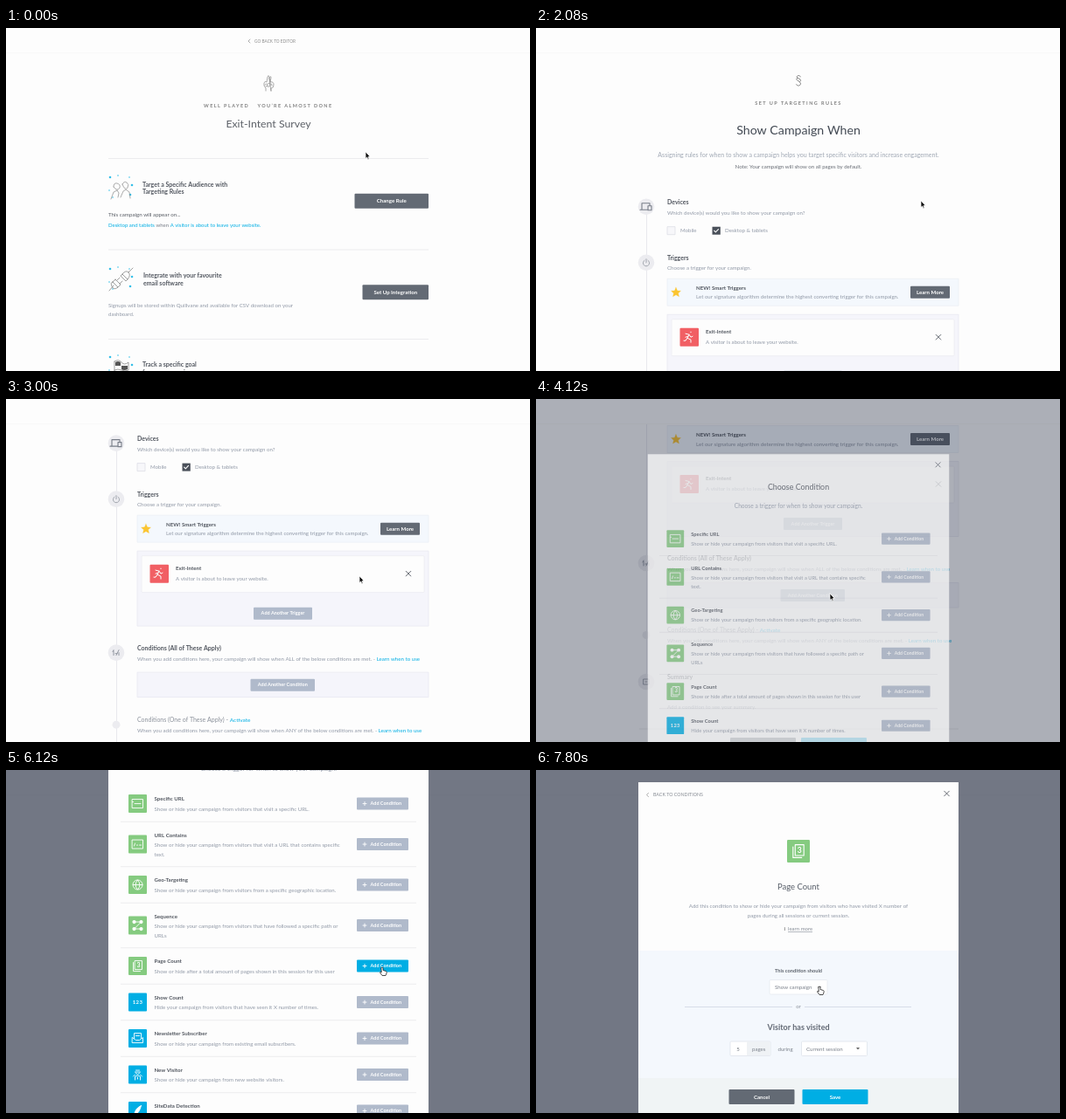
An HTML page with a canvas that plays this animation: 599 px wide and 393 px high, repeating every 8000 ms.

```html
<!DOCTYPE html>
<html lang="en">
<head>
<meta charset="utf-8">
<title>Campaign targeting rules</title>
<style>
  html, body { margin: 0; width: 100%; height: 100%; overflow: hidden; background: #fdfdfd; }
  canvas { display: block; width: 599px; height: 393px; }
</style>
</head>
<body>
<canvas id="stage" width="599" height="393"></canvas>
<script>
const W = 599, H = 393, LOOP = 8000;
const screen2d = document.getElementById('stage').getContext('2d');
const scratch = document.createElement('canvas');
scratch.width = W;
scratch.height = H;
const scratch2d = scratch.getContext('2d');
let ctx = screen2d;

const WHITE = '#fdfdfd', INK = '#51565f', SOFT = '#9199a7', CYAN = '#00aee4', GREEN = '#85cb80';
const SLATE = '#636a74', MUTED = '#b0bacb', RULE = '#ececee', PALE = '#f4f8fd', LILAC = '#f5f5fb';
const VEIL = 'rgb(23 30 53 / 0.6)';

// ---- timing ----
const clamp = v => Math.max(0, Math.min(1, v));
const ramp = (t, a, b) => clamp((t - a) / (b - a));
const smooth = p => p * p * (3 - 2 * p);
const easeOut = p => 1 - (1 - p) ** 2;

function track(keys, t) {
  if (t <= keys[0][0]) return keys[0].slice(1);
  for (let i = 1; i < keys.length; i++) {
    if (t > keys[i][0]) continue;
    const [a, b] = [keys[i - 1], keys[i]];
    const p = smooth(ramp(t, a[0], b[0]));
    return a.slice(1).map((v, k) => v + (b[k + 1] - v) * p);
  }
  return keys[keys.length - 1].slice(1);
}

const PAGE_SCROLL = [[2060, 0], [2840, 128], [2900, 128], [3140, 197], [3300, 197], [3520, 257]];
const MODAL_SCROLL = [[4560, 0], [4860, 55], [4980, 55], [5090, 78.5]];
const POINTER = [
  [820, 411, 142], [1160, 440, 198], [2450, 440, 198], [2840, 404, 203], [3660, 404, 203],
  [3920, 336, 223], [4260, 336, 223], [4600, 325, 225], [5660, 325, 225], [6060, 430, 226],
  [6900, 430, 226], [7480, 371, 232], [7540, 371, 232], [7800, 324, 248]
];

// ---- drawing helpers ----
function rect(x, y, w, h, fill, stroke, r = 0) {
  ctx.beginPath();
  ctx.roundRect(x, y, w, h, r);
  if (fill) { ctx.fillStyle = fill; ctx.fill(); }
  if (stroke) { ctx.strokeStyle = stroke; ctx.lineWidth = 0.8; ctx.stroke(); }
}

function disc(x, y, r, fill) {
  ctx.beginPath();
  ctx.arc(x, y, r, 0, 7);
  ctx.fillStyle = fill;
  ctx.fill();
}

function path(d, x, y, color, width = 0.8, fill) {
  const p = new Path2D(d);
  ctx.save();
  ctx.translate(x, y);
  ctx.lineCap = ctx.lineJoin = 'round';
  if (fill) { ctx.fillStyle = fill; ctx.fill(p); }
  ctx.strokeStyle = color;
  ctx.lineWidth = width;
  if (width) ctx.stroke(p);
  ctx.restore();
}

const hline = (x1, x2, y, color = RULE) => rect(x1, y - 0.5, x2 - x1, 1, color);

// y is the optical middle of the line; returns the x where the text ends
function text(str, x, y, size = 6.13, color = SOFT, { bold, align = 'left', gap = 0 } = {}) {
  ctx.font = `${bold ? 700 : 400} ${size}px Lato, sans-serif`;
  ctx.letterSpacing = gap + 'px';
  ctx.textAlign = align;
  ctx.fillStyle = color;
  ctx.fillText(str, x, y + size * 0.34);
  return x + ctx.measureText(str).width;
}
const heading = (str, x, y, size = 7) => text(str, x, y, size, INK, { bold: true });
const centered = (str, y, size, color, opts) => text(str, 300, y, size, color, { align: 'center', ...opts });

function button(label, x, y, w, h, fill, size = 6.1) {
  rect(x, y, w, h, fill, null, 1);
  text(label, x + w / 2, y + h / 2, size, '#fff', { bold: true, align: 'center' });
}

const cross = (x, y) => path('M-2.8-2.8L2.8 2.8M2.8-2.8L-2.8 2.8', x, y, '#555b64', 0.9);
const chevron = (x, y) => path('M1-2L-1 0L1 2', x, y, '#888', 0.7);
const caret = (x, y) => path('M-2-1H2L0 1.5Z', x, y, '#666', 0, '#666');

function group(alpha, draw) {
  if (alpha <= 0) return;
  if (alpha >= 1) return draw();
  scratch2d.clearRect(0, 0, W, H);
  ctx = scratch2d;
  draw();
  ctx = screen2d;
  ctx.globalAlpha = alpha;
  ctx.drawImage(scratch, 0, 0);
  ctx.globalAlpha = 1;
}

function at(x, y, scale, draw) {
  ctx.save();
  ctx.translate(x, y);
  ctx.scale(scale, scale);
  draw();
  ctx.restore();
}

// ---- campaign overview ----
function sparks(x, y) {
  [[-12, -12], [-3, -14], [10, -12], [13, -3], [-13, 3], [-9, 11], [11, 8]]
    .forEach(([dx, dy], i) => disc(x + dx, y + dy, i % 3 ? 0.8 : 1.3, '#35bfe8'));
}

function overview() {
  chevron(278, 15);
  text('GO BACK TO EDITOR', 284, 15, 4.75, '#8c8c8c');
  path('M-3 9V6Q-6 3-5 0T-2-1L-1-7Q0-10 1-7L2-1M1-6Q3-9 3-6L2-1Q6-2 6 2T3 6V9ZM-4 2Q-2 0-1 2T-3 4M-1 1Q2-1 2 2T-1 4M2 1Q4 0 4 3', 300, 63, '#888', 0.7);
  text('WELL PLAYED', 226, 89, 5.5, '#808080', { bold: true, gap: 1.42 });
  text('YOU’RE ALMOST DONE', 287.5, 89, 5.5, '#808080', { bold: true, gap: 1.38 });
  centered('Exit-Intent Survey', 109.5, 12.3, '#5c6067');
  [149.5, 254, 356.5].forEach(y => hline(117, 483, y));

  sparks(131, 183);
  path('M-11 12L-8 4L-4 2M-8-2Q-8-7-4-6T-1-1Q-4 4-8-2M0 10L3 3L6 1L10 4L11 11M2-5Q4-9 7-7T8-1Q5 3 2-5M-4 2L-2 5L-3 10', 131, 184, '#888', 0.7);
  heading('Target a Specific Audience with', 156, 179.5);
  heading('Targeting Rules', 156, 188);
  text('This campaign will appear on...', 117, 214, 6.2, '#585d65');
  let x = text('Desktop and tablets ', 117, 226, 6.03, CYAN);
  x = text('when ', x, 226, 6.03, '#777d87');
  text('A visitor is about to leave your website.', x, 226, 6.03, CYAN);
  button('Change Rule', 398.5, 189.8, 84.5, 17, SLATE);

  sparks(131, 288);
  path('M-13 13L-8 7M-9 3L-3 9Q-8 13-10 8T-9 3M-6 0L0 6L-3 9M-9 3L-6 0M-4 1L-1-2M-1 5L2 2M2-6L8 0Q12-5 9-8T2-6L0-4L6 2L8 0M9-8L14-13', 131, 288, '#808080', 0.75);
  heading('Integrate with your favourite', 157, 284);
  heading('email software', 157, 293);
  text('Signups will be stored within Quillvane and available for CSV download on your', 117, 317.5, 6.08);
  text('dashboard.', 117, 328, 6.08);
  button('Set Up Integration', 407.5, 294.3, 75.5, 17, SLATE);

  sparks(131, 389);
  path('M-7-7V10M-7-7Q-2-10 1-6T9-6V3Q5 5 1 3T-7 3', 131, 389, '#777', 0.7);
  path('M-6-6Q-3-8 0-6V-2H-6ZM1-2H8V2Q4 4 1 2Z', 131, 389, '#555', 0, '#555');
  heading('Track a specific goal', 156, 386);
  heading('for your campaign', 156, 395);
}

// ---- targeting rules page ----
function conditionNote(y, which) {
  const x = text(`When you add conditions here, your campaign will show when ${which} of the below conditions are met. - `, 150, y);
  text('Learn when to use', x, y, 6.13, CYAN);
}

function rules(scroll) {
  ctx.save();
  ctx.beginPath();
  ctx.rect(0, 29, W, H);
  ctx.clip();
  ctx.translate(0, -scroll);

  path('M2.5-4.5Q1-6.5-1-5.5T-1-3L2-1.5Q3.5 0 1.5 1.5L-1 0Q-3.5-1-1.5-3M1.5 1.5Q4 4 1.5 5.5T-2.5 4.5', 300, 60.5, '#808080', 0.9);
  centered('SET UP TARGETING RULES', 86, 5.5, '#808080', { bold: true, gap: 1.42 });
  centered('Show Campaign When', 117, 14.2, '#434a54');
  centered('Assigning rules for when to show a campaign helps you target specific visitors and increase engagement.', 146, 7.05, '#a0a8b4');
  centered('Note: Your campaign will show on all pages by default.', 159, 6.1, '#666b73');

  rect(126, 205, 0.8, 376, '#e4e4ea');
  [205, 269, 445, 581].forEach(y => disc(126, y, 9.3, '#ececf0'));
  disc(126, 527.5, 4.5, '#ececf0');
  path('M-5 3V-4H4V-1M-7 3.5H2M2-1H6V4H2Z', 126, 205, '#777d88', 1.1);
  path('M-2-2.5A3.6 3.6 0 1 0 2-2.5M0-4V0', 126, 269, '#9a9fa8', 0.9);
  path('M-3 3V-2M-4-1L-3-3M0 3L3-3M3 3V0M-1 1H1', 126, 445, '#8b909a', 0.9);
  path('M-3-3H3V3H-3ZM-1 0H1', 126, 581, '#8b909a', 0.8);

  heading('Devices', 150, 200);
  text('Which device(s) would you like to show your campaign on?', 150, 212);
  rect(150, 228, 9, 9, '#f7f7fa', '#dedfe6');
  text('Mobile', 165, 232.5, 6.1);
  rect(201.5, 228, 9.3, 9, '#4a505a');
  path('M-2.3 0L-.7 1.7L2.5-1.7', 206, 232.5, '#fff', 1.1);
  text('Desktop & tablets', 216, 232.5, 6.2);

  heading('Triggers', 150, 263.5);
  text('Choose a trigger for your campaign.', 150, 275.5);
  rect(150, 287.5, 333, 31, PALE, '#ebeff5');
  path('M0-5.5L1.6-1.8L5.5-1.5L2.6 1.2L3.5 5L0 3L-3.5 5L-2.6 1.2L-5.5-1.5L-1.6-1.8Z', 160, 303, '#fbc531', 0.3, '#fbc531');
  heading('NEW! Smart Triggers', 183, 298, 6.13);
  text('Let our signature algorithm determine the highest converting trigger for this campaign.', 183, 308.5);
  button('Learn More', 428, 296, 45, 14, SLATE);

  rect(150, 328.5, 333, 86, LILAC, '#e9e9f2');
  rect(155, 334, 323, 42, WHITE, '#ececf2', 1);
  rect(164.5, 344, 21.5, 21, '#f15f64', null, 1);
  path('M-4-4L0-3L2 0L4-1M0-3L-2 1L2 3L2 6M-2 1L-4 4L-6 4M-1-1L-4 0M2-6L2-5.5', 175, 354.5, '#fff', 1);
  heading('Exit-Intent', 194, 348, 6.13);
  text('A visitor is about to leave your website.', 194, 360);
  cross(460, 354.5);
  button('Add Another Trigger', 283, 393, 67, 14, MUTED, 5.5);

  heading('Conditions (All of These Apply)', 150, 440);
  conditionNote(452, 'ALL');
  rect(150, 467.5, 333, 28.5, LILAC, '#e9e9f2');
  button('Add Another Condition', 279.5, 475, 73.5, 14, MUTED, 5.5);

  const x = text('Conditions (One of These Apply) - ', 150, 522, 7, '#8b919b');
  text('Activate', x, 522, 6.5, CYAN);
  conditionNote(534, 'ANY');

  heading('Summary', 150, 576);
  text('Add a condition to see your summary.', 150, 610);
  hline(118, 483, 635);
  button('Cancel', 222, 645, 75, 17, SLATE);
  button('Save', 303, 645, 75, 17, CYAN);
  ctx.restore();
}

// ---- modal: list of conditions ----
const SHOW = 'Show or hide your campaign from ';
const CONDITIONS = [
  ['Specific URL', SHOW + 'visitors that visit a specific URL.'],
  ['URL Contains', SHOW + 'visitors that visit a URL that contains specific', 'text.'],
  ['Geo-Targeting', SHOW + 'visitors from a specific geographic location.'],
  ['Sequence', SHOW + 'visitors that have followed a specific path or', 'URLs'],
  ['Page Count', 'Show or hide after a total amount of pages shown in this session for this user'],
  ['Show Count', 'Hide your campaign from visitors that have seen it X number of times.'],
  ['Newsletter Subscriber', SHOW + 'existing email subscribers.'],
  ['New Visitor', SHOW + 'new website visitors.'],
  ['SiteData Detection', SHOW + 'visitors with specific site data.']
];
const GLYPHS = [
  'M-6-5H6V5H-6ZM-3.5 0H3.5M-6-2H-5',
  'M-6-5H6V5H-6ZM-4 2L-3-1M-1 1H0M2 1H4',
  'M-5.5 0A5.5 5.5 0 1 0 5.5 0A5.5 5.5 0 1 0-5.5 0H5.5M0-5.5Q-5 0 0 5.5Q5 0 0-5.5',
  'M-4-4H4L-4 4H4',
  'M-3-6H5V4H-3ZM-5-4V6H3',
  '',
  'M-4 0V-6H4V0M-6-1L-2 2H2L6-1V5H-6ZM-2-3H2',
  'M-3-3H3M-2-5H2M-2-2Q0 2 2-2M-3 6V2Q0 0 3 2V6M-5 2L-3 0M5 2L3 0M0 3V5',
  'M4-6Q-3-3-4 5Q2 3 4-6'
];

function glyph(i, x, y, size = 21) {
  at(x, y, size / 21, () => {
    rect(-10.5, -10.5, 21, 21, i < 5 ? GREEN : CYAN, null, 1);
    path(GLYPHS[i], 0, 0, '#fff', 0.9, i === 8 ? '#fff' : null);
    if (i === 3) [[-4, -4], [4, -4], [-4, 4], [4, 4]].forEach(([dx, dy]) => disc(dx, dy, 2.1, '#fff'));
    if (i === 4) text('3', 1, -1, 7, '#fff', { bold: true, align: 'center' });
    if (i === 5) text('123', 0, 0, 6, '#fff', { bold: true, align: 'center', gap: 0.4 });
  });
}

function conditionList(hovered) {
  rect(117, 0, 366, 1650, WHITE);
  cross(469.5, 13);
  centered('Choose Condition', 40.5, 9.45, INK);
  centered('Choose a trigger for when to show your campaign.', 63.5, 7.05, '#98a0ae');
  let top = 82.3;
  CONDITIONS.forEach(([name, ...lines], i) => {
    const height = lines.length > 1 ? 51.5 : 41.5;
    const mid = top + height / 2;
    const first = lines.length > 1 ? mid - 10.5 : mid - 5.5;
    glyph(i, 150.5, mid);
    heading(name, 169.5, first, 6.13);
    lines.forEach((line, k) => text(line, 169.5, first + 11.7 + k * 10.3));
    rect(401, mid - 7, 59, 14, hovered && i === 4 ? CYAN : MUTED, null, 1);
    path('M-2 0H2M0-2V2', 410, mid, '#fff', 0.9);
    text('Add Condition', 416.5, mid, 5.5, '#fff', { bold: true });
    top += height;
    hline(131, 469, top);
  });
}

// ---- modal: page count settings ----
function pageCount() {
  rect(117, 14, 366, 193, WHITE);
  rect(117, 207, 366, 146, PALE);
  rect(117, 353, 366, 40, '#f0f4f5');
  chevron(127.5, 28.5);
  text('BACK TO CONDITIONS', 134, 28.5, 5.3, '#868b93');
  cross(469.5, 27);
  glyph(4, 300, 93, 26);
  centered('Page Count', 133.5, 9.45, '#555c67');
  centered('Add this condition to show or hide your campaign from visitors who have visited X number of', 156);
  centered('pages during all sessions or current session.', 166.5);
  text('i', 283.5, 182, 6, '#777', { bold: true });
  text('learn more', 288, 182, 6, '#888e98');
  hline(288, 316, 185.5, '#b5b9c0');

  centered('This condition should', 230, 5.7, '#5f656e', { bold: true });
  rect(267, 240.5, 66, 16.5, '#fff', '#e6eaf0', 1);
  text('Show campaign', 273, 248.5, 6.2, '#7b818b');
  caret(324, 249);
  hline(170, 293, 271.5, '#d7dce8');
  hline(307, 429, 271.5, '#d7dce8');
  centered('or', 271, 6, '#888e98');

  centered('Visitor has visited', 295, 9, '#626974', { bold: true });
  rect(222, 311, 46, 16.5, '#fff', '#dfe4eb', 1);
  rect(241, 311.4, 26.6, 15.7, '#eff2f5');
  text('5', 231, 319.5, 6.1, '#70767f', { align: 'center' });
  text('pages', 247, 319.5, 6.13, '#7b818b');
  text('during', 276.5, 319.5, 6.13, '#7b818b');
  rect(303.5, 311, 75, 16.5, '#fff', '#dfe4eb', 1);
  text('Current session', 309, 319.5, 6.13, '#7b818b');
  caret(368, 319);
  button('Cancel', 220.5, 366, 75, 17, SLATE);
  button('Save', 304.5, 366, 75, 17, CYAN);
}

// ---- pointer ----
function pointer(t) {
  const [x, y] = track(POINTER, t);
  const hand = (t > 1080 && t < 1740) || (t > 5980 && t < 6360) || t > 7680;
  if (hand) {
    path('M-1 .5Q0-.6 1 .5V3.5L4.5 4.5Q5.5 5 5 7L4 9.5H0L-2.5 6Q-2.5 4.6-1 5.5Z', x, y, '#222', 0.8, '#fff');
  } else if (t > 4600 && t < 5320) {
    path('M-2-3Q0-3 0-2Q0-3 2-3M0-2V4M-2 5Q0 5 0 4Q0 5 2 5', x, y, '#444', 0.8);
  } else {
    path('M0 0V7.5L1.7 6L2.8 8.8L4 8.2L3 5.6H5Z', x, y, '#fff', 0.7, '#111');
  }
}

function render(t) {
  rect(0, 0, W, H, WHITE);
  hline(0, W, 28.5, '#f8f8f8');

  group(1 - ramp(t, 1370, 1490), overview);
  const scroll = track(PAGE_SCROLL, t)[0];
  group(ramp(t, 1470, 1600), () => rules(scroll));

  if (t > 4040) {
    group(ramp(t, 4040, 4180), () => rect(0, 0, W, H, VEIL));
    const open = easeOut(ramp(t, 4040, 4217));
    const zoom = 0.8 + 0.2 * open;
    const top = 14 + 167 * (1 - open) - track(MODAL_SCROLL, t)[0];
    const hovered = t > 5980;
    // the page fades away behind the modal so the veil stays plain once it closes
    if (t > 4300) {
      rect(117, 29, 366, H, WHITE);
      rect(117, 29, 366, H, VEIL);
    }
    group(Math.min(open, 1 - ramp(t, 6280, 6360)), () =>
      at(300 * (1 - zoom), top, zoom, () => conditionList(hovered)));
    group(smooth(ramp(t, 6690, 6920)), pageCount);
  }
  pointer(t);
}

const start = performance.now();
function frame() {
  render((performance.now() - start) % LOOP);
  requestAnimationFrame(frame);
}
frame();
</script>
</body>
</html>
```
